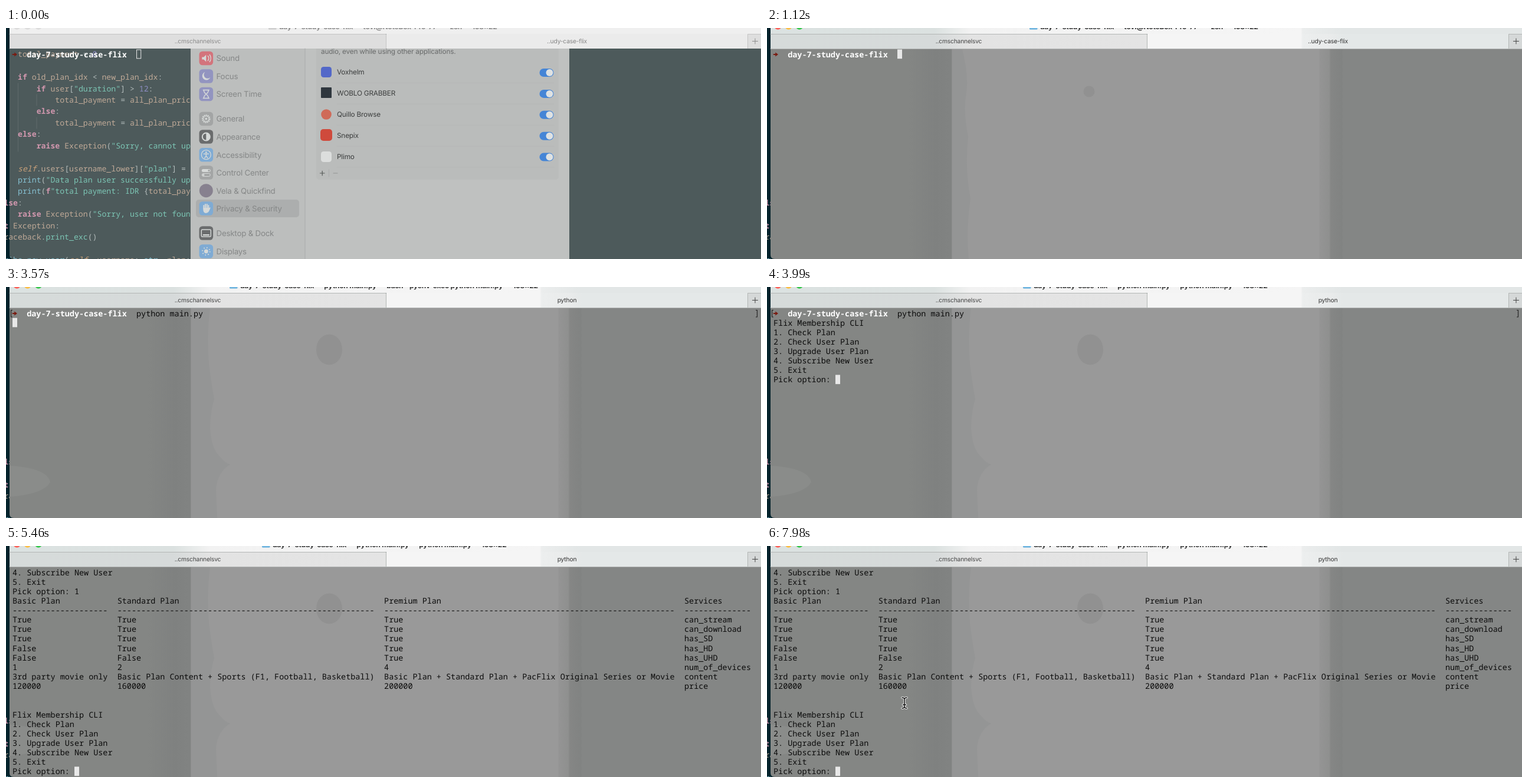
Animation, 1280 px wide and 393 px high, one loop 8 s. Source, as an HTML page:

```html
<!DOCTYPE html>
<html lang="en">
<head>
<meta charset="utf-8">
<title>Terminal session</title>
<style>
  html, body { margin: 0; width: 100%; height: 100%; overflow: hidden; background: #04232c; }
  svg { display: block; width: 100vw; height: 100vh; }
  text { white-space: pre; text-rendering: geometricPrecision; }
  .ui { font-family: Inter, sans-serif; letter-spacing: -.2px; }
  .side { font-size: 13.3px; fill: #858787; }
  .list { font-size: 11.8px; fill: #3b3d3d; }
  .tab { font-size: 10.3px; text-anchor: middle; }
  .title { font-size: 12px; font-weight: 700; }
  .code { font: 13.2px "Noto Sans Mono", monospace; }
  .term { font: 13.463px "Noto Sans Mono", monospace; fill: #0b0b0b; }
  .k { fill: #d197ae; font-weight: 700; }
  .v { fill: #bfa997; }
  .s { fill: #7cc5b4; }
  .f { fill: #86c1d2; }
  .o { fill: #b3bcbb; }
  .n { fill: #8f8ec4; }
  .i { fill: #c9a07a; font-style: italic; }
</style>
</head>
<body>
<svg id="stage" viewBox="0 0 1280 393" preserveAspectRatio="none"></svg>
<script>
const LOOP = 8000, TICK = 70;
const CW = 8.078, RH = 16.14, LEFT = 11, TOP = 36.5;
const CODE_W = 7.92, CODE_H = 19.42;

const esc = s => s.replace(/&/g, '&amp;').replace(/</g, '&lt;');
const rect = (x, y, w, h, fill, rx = 0) =>
  `<rect x="${x}" y="${y}" width="${w}" height="${h}" fill="${fill}" rx="${rx}"/>`;
const disc = (x, y, r, fill) => `<circle cx="${x}" cy="${y}" r="${r}" fill="${fill}"/>`;
const line = (d, stroke, w = 1) =>
  `<path d="${d}" fill="none" stroke="${stroke}" stroke-width="${w}" stroke-linecap="round"/>`;
const text = (x, y, s, cls, more = '') => `<text x="${x}" y="${y}" class="${cls}" ${more}>${esc(s)}</text>`;
const group = (id, body) => `<g id="${id}">${body}</g>`;

// horizontal gradient from [x, colour] stops over the full width
const ramp = (id, stops) =>
  `<linearGradient id="${id}" gradientUnits="userSpaceOnUse" x1="0" x2="1280">` +
  stops.map(([x, c]) => `<stop offset="${x / 1280}" stop-color="${c}"/>`).join('') + '</linearGradient>';

/* ---- editor behind the terminal ---- */
// [row, indent, tokens]; each token starts with its class letter
const CODE = [
  [-2, 0, 'vtotal_payment `o= `n0'],
  [0, 0, 'kif `vold_plan_idx `o< `vnew_plan_idx`o:'],
  [1, 1, 'kif `vuser`o[`s"duration"`o] > `n12`o:'],
  [2, 2, 'vtotal_payment `o= `vall_plan_price'],
  [3, 1, 'kelse`o:'],
  [4, 2, 'vtotal_payment `o= `vall_plan_price'],
  [5, 0, 'kelse`o:'],
  [6, 1, 'kraise `vException`o(`s"Sorry, cannot upgrade'],
  [8, 0, 'iself`o.`vusers`o[`vusername_lower`o][`s"plan"`o] = '],
  [9, 0, 'fprint`o(`s"Data plan user successfully updated'],
  [10, 0, 'fprint`o(`kf`s"total payment: IDR `o{`vtotal_payment'],
  [11, -1, 'kelse`o:'],
  [12, 0, 'kraise `vException`o(`s"Sorry, user not found'],
  [13, -2, 'kexcept `vException`o:'],
  [14, -1, 'vtraceback`o.`sprint_exc`o()'],
  [16, -3, 'kdef `fsubscribe_new_user`o(`iself`o, `vusername`o: `fstr`o, `vplan`o:']
];
const codeLine = ([row, indent, src]) =>
  `<text x="${20 + indent * 4 * CODE_W}" y="${88.2 + row * CODE_H}" class="code">` +
  src.split('`').map(p => `<tspan class="${p[0]}">${esc(p.slice(1))}</tspan>`).join('') + '</text>';
const code = CODE.map(codeLine).join('') +
  line('M20.5 94V210M52 113V132M52 152V171', 'rgba(255,255,255,.1)');

/* ---- settings window ---- */
const BLUE = '#7fabd4', VIOLET = '#9294c0', GREY = '#a3a5a5', DARK = '#6a6c6d', PALE = '#d6d9d8';
const MARK = {
  sound: line('M3 -4Q6 0 3 4M6 -6Q10 0 6 6', PALE, 1.4) + `<path d="M-7 -2H-4L0 -6V6L-4 2H-7Z" fill="${PALE}"/>`,
  moon: `<path d="M-2 -7A7 7 0 1 0 7 2A6 6 0 0 1 -2 -7Z" fill="${PALE}"/>`,
  glass: line('M-5 -7H5M-5 7H5M-4 -7Q-4 -3 0 0Q4 3 4 7M4 -7Q4 -3 0 0Q-4 3 -4 7', PALE, 1.5),
  gear: `<circle r="6" fill="none" stroke="${PALE}" stroke-width="2.4" stroke-dasharray="2 1"/>` +
    `<circle r="4.6" fill="none" stroke="${PALE}"/>` + disc(0, 0, 1.8, PALE),
  half: `<circle r="6.5" fill="none" stroke="${PALE}" stroke-width="2"/><path d="M0 -6A6 6 0 0 1 0 6Z" fill="${PALE}"/>`,
  person: `<circle r="8" fill="none" stroke="${PALE}" stroke-width="1.3"/>` + disc(0, -4, 1.4, PALE) +
    line('M-4 -1.5H4M0 -1V2L-2.5 5.5M0 2L2.5 5.5', PALE, 1.4),
  sliders: rect(-7.5, -6, 15, 5, PALE, 2.5) + disc(4.8, -3.5, 1.7, GREY) +
    `<rect x="-7" y="1.5" width="14" height="5" rx="2.5" fill="none" stroke="${PALE}"/>` + disc(-4.5, 4, 1.7, PALE),
  hand: line('M-4 0V-5M-1.4 0V-7M1.4 0V-7M4 0V-5', PALE, 2) +
    `<path d="M-5 -1H5L7 -2Q8 -1 4 6Q2 8 -1 8Q-5 7 -5 2Z" fill="${PALE}"/>`,
  dock: `<rect x="-8" y="-6" width="16" height="12" rx="1.5" fill="none" stroke="${PALE}" stroke-width="1.5"/>` +
    rect(-5.5, 2, 11, 2.2, PALE),
  sun: disc(0, 0, 3.4, PALE) + `<circle r="6.3" fill="none" stroke="${PALE}" stroke-width="2" stroke-dasharray="1.6 3.35"/>`
};
const SIDE = [
  [51.5, 'Sound', '#d3747c', 'sound'], [82, 'Focus', VIOLET, 'moon'], [112.5, 'Screen Time', VIOLET, 'glass'],
  [154.5, 'General', GREY, 'gear'], [185, 'Appearance', DARK, 'half'], [215.7, 'Accessibility', BLUE, 'person'],
  [246, 'Control Center', GREY, 'sliders'], [276.7, 'Vela & Quickfind', '', ''],
  [307, 'Privacy & Security', BLUE, 'hand'], [349, 'Desktop & Dock', DARK, 'dock'], [380, 'Displays', BLUE, 'sun']
];
const sideRow = ([y, label, fill, mark]) =>
  (mark ? rect(327.5, y - 11.8, 23.6, 23.6, fill, 5.5) + `<g transform="translate(339.3 ${y})">${MARK[mark]}</g>`
        : disc(339.3, y, 11.5, '#87818f')) +
  text(356.5, y + 4.8, label, 'ui side');

const APPS = [
  ['Voxhelm', rect(534, 66, 18, 18, '#5368c8', 4.5)],
  ['WOBLO GRABBER', rect(534, 101, 18, 18, '#2f373e', 1)],
  ['Quillo Browse', disc(543, 147, 8.8, '#cf6a58')],
  ['Snepix', rect(533, 172, 20, 20, '#cf4a3c', 5)],
  ['Plimo', rect(534, 210, 18, 18, '#dcdedd', 4.5)]
];
const appRow = ([label, icon], i) => {
  const y = 76 + i * 35.9;
  return icon + text(561, y + 3.2, label, 'ui list') +
    rect(904.5, y - 7, 24, 14, '#4585d6', 7) + disc(921.5, y, 6, '#dfe2e2') +
    line(`M561 ${y + 17.5}H929`, '#b5b7b6', .8);
};
const settings = rect(313, 35, 642, 358, '#bfc1c0') + rect(313, 35, 194, 358, '#bcbebd') +
  line('M507 35V393', '#a9abab') + rect(322, 292, 175, 30, '#acaeae', 5) +
  SIDE.map(sideRow).join('') +
  rect(526, 54, 411, 204, '#babcbb', 5) + rect(526, 35, 411, 30, '#babcbb') +
  text(534, 44.3, 'audio, even while using other applications.', 'ui list', 'style="fill:#696b6b"') +
  APPS.map(appRow).join('') +
  line('M532.5 247H540M536.2 243.3V250.8', '#555857', 1.2) + line('M547.5 241V253', '#a9abab') +
  line('M555 247H562', '#929494', 1.2);

/* ---- terminal ---- */
const put = (row, col, s, more = '') => text(LEFT + col * CW, 49.5 + row * RH, s, 'term', more);
const block = (row, lines) => lines.map((s, i) => put(row + i, 0, s)).join('');
const MENU = ['Flix Membership CLI', '1. Check Plan', '2. Check User Plan', '3. Upgrade User Plan',
  '4. Subscribe New User', '5. Exit', 'Pick option: '];
const COLS = [0, 22, 78, 141];
const TABLE = [
  ['Basic Plan', 'Standard Plan', 'Premium Plan', 'Services'],
  [20, 54, 61, 14].map(n => '-'.repeat(n)),
  ['True', 'True', 'True', 'can_stream'],
  ['True', 'True', 'True', 'can_download'],
  ['True', 'True', 'True', 'has_SD'],
  ['False', 'True', 'True', 'has_HD'],
  ['False', 'False', 'True', 'has_UHD'],
  ['1', '2', '4', 'num_of_devices'],
  ['3rd party movie only', 'Basic Plan Content + Sports (F1, Football, Basketball)',
    'Basic Plan + Standard Plan + PacFlix Original Series or Movie', 'content'],
  ['120000', '160000', '200000', 'price']
];
const prompt = line('M11.5 45H15', '#7a1c12', 2) + '<path d="M14.2 41.5L19 45L14.2 48.5Z" fill="#7a1c12"/>' +
  put(0, 3, 'day-7-study-case-flix', 'style="font-weight:700;fill:#fff"') +
  '<text id="cmd" x="' + (LEFT + 26 * CW) + '" y="49.5" class="term"></text>' +
  group('marks', line('M10.5 39.5H8.5V51H10.5M1271.5 39.5H1273.5V51H1271.5', '#222', 1.1));
const result = block(0, [...MENU.slice(4, 6), 'Pick option: 1']) +
  TABLE.map((r, i) => r.map((s, c) => put(3 + i, COLS[c], s)).join('')).join('') + block(15, MENU);

/* ---- blurred backdrop ---- */
const BASE = '#949595';
const backdrop = rect(6, 36, 1274, 357, 'url(#glass)') +
  group('edgeA', `<path d="M314 36H331Q342 80 338 110Q332 140 341 185Q335 240 345 290Q337 345 342 393H314Z" fill="${BASE}"/>` +
    disc(546, 108, 9.5, '#919191')) +
  group('edgeB', `<path d="M314 36H346Q340 80 344 130Q348 165 353 190Q346 215 346 240Q348 275 362 288Q372 300 380 302Q358 315 356 345L358 393H314Z" fill="${BASE}"/>` +
    '<ellipse cx="548" cy="106.5" rx="22" ry="26" fill="#919191"/>' +
    '<path d="M6 304Q70 308 75 332Q65 352 6 357Z" fill="#8a8c8a"/>');

/* ---- window frame ---- */
const chrome = (id, strip, tab, live, edge, ink, lights) => group(id,
  rect(6, 0, 1274, 10, strip) + rect(6, 10, 638, 26, tab) + rect(645, 10, 612, 26, live) +
  rect(1257, 10, 23, 26, tab) +
  line('M6 10.5H644.5V35M1257.5 35V10.5H1280M6 35.5H1280', edge) +
  [18.5, 36.5, 55].map((x, i) => disc(x, -3.3, 6, lights[i])).join('') +
  line('M1265.5 22.5H1274.5M1270 18V27', ink, 1) +
  text(325, 26.2, '..cmschannelsvc', 'ui tab', `fill="${ink}"`));

document.getElementById('stage').innerHTML = '<defs>' +
  ramp('glass', [[6, '#848684'], [240, '#848684'], [286, '#7f8180'], [313, '#818382'], [314, '#999'],
    [936, '#999'], [937, '#949494'], [953, '#8f908f'], [956, '#858685'], [975, '#818382'], [976, '#848685'], [1280, '#848685']]) +
  ramp('strip', [[6, '#dbe2e1'], [285, '#dbe1e0'], [345, '#f2f2f2'], [905, '#f5f5f5'], [908, '#ebeded'], [975, '#e2e6e6'], [1280, '#e2e6e6']]) +
  ramp('tabs', [[6, '#d6dbda'], [285, '#d6dada'], [345, '#e3e3e3'], [644, '#e4e4e4'], [1256, '#d5d8d8'], [1280, '#d5d8d8']]) +
  ramp('live', [[645, '#f5f5f5'], [905, '#f5f5f5'], [908, '#eceeee'], [955, '#e9ebeb'], [976, '#e4e8e8'], [1280, '#e4e8e8']]) +
  '<clipPath id="rim"><rect width="6" height="393"/></clipPath>' +
  '<clipPath id="pane"><rect x="6" y="35" width="307" height="358"/></clipPath></defs>' +
  rect(0, 0, 1280, 393, '#04232c') + `<g clip-path="url(#rim)">${code}</g>` +
  chrome('idle', '#efefef', '#dedede', '#ebebeb', '#c4c4c4', '#8b8b8b', ['#dcdcdc', '#dcdcdc', '#dcdcdc']) +
  group('clear', rect(6, 35, 1274, 358, '#4d5a5b') + `<g clip-path="url(#pane)">${code}</g>` + settings) +
  group('blur', backdrop) +
  chrome('busy', 'url(#strip)', 'url(#tabs)', 'url(#live)', '#b3b6b5', '#444', ['#fc5f57', '#fdbc40', '#34c749']) +
  '<text id="tabName" x="951" y="26.2" class="ui tab"></text>' +
  group('folder', rect(0, -8, 13.5, 10.8, '#74b7e0', 1.5)) +
  '<text id="title" y="2.3" class="ui title"></text>' +
  group('close', line('M14 20L19.5 25.5M19.5 20L14 25.5', '#9da1a0', 1.1)) +
  group('prompt', prompt) + group('menu', block(1, MENU)) + group('pick', put(7, 13, '1')) +
  group('result', result) +
  '<rect id="caret"/>' +
  '<path d="M6 386Q6 393 13 393H6Z" fill="#04232c"/>' +
  group('mouse', ['#eee', '#111'].map((c, i) =>
    line('M-4 -9Q0 -9 0 -6V6Q0 9 -4 9M4 -9Q0 -9 0 -6M0 6Q0 9 4 9M-2.5 3H2.5', c, i ? 1.5 : 3.6)).join(''));

/* ---- timeline ---- */
const CARET = [[0, 26, 0], [2100, 27, 0], [2450, 41, 0], [3290, 40, 0], [3500, 0, 1],
  [3710, 13, 7], [4340, 14, 7], [5320, 0, 8], [5390, 13, 21]];
const TYPED = [[0, ''], [2100, 'p'], [2450, 'python main.py']];
const DIR = 'day-7-study-case-flix — ';
const TITLE = [
  [0, 463, DIR + 'tovi@NoteBox-Pro-77 — -zsh — 158×22'],
  [3570, 397, DIR + 'python main.py — bash - pyenv-exec python main.py — 158×22'],
  [3710, 452, DIR + 'python main.py — python main.py — 158×22']
];
const PATHS = [
  [[6160, 1169, 171], [6300, 940, 110], [6440, 646, 42], [6510, 646, 42]],
  [[6790, 293, 72], [6860, 268, 135], [6930, 246, 195], [7000, 236, 230], [7140, 236, 230],
    [7210, 235, 244], [7350, 233.5, 271], [7420, 233.5, 271], [7490, 233, 267], [LOOP, 233, 267]]
];
const last = (table, t) => table.filter(r => r[0] <= t).pop();
const mouseAt = t => {
  const path = PATHS.find(p => t >= p[0][0] && t < p[p.length - 1][0]);
  if (!path) return null;
  const i = path.findIndex(p => p[0] > t), a = path[i - 1], b = path[i];
  const u = (t - a[0]) / (b[0] - a[0]);
  return [a[1] + (b[1] - a[1]) * u, a[2] + (b[2] - a[2]) * u];
};

const $ = id => document.getElementById(id);
const show = (id, on) => { $(id).style.display = on ? '' : 'none'; };
const set = (id, attrs) => { for (const k in attrs) $(id).setAttribute(k, attrs[k]); };
const write = (id, s) => { if ($(id).textContent !== s) $(id).textContent = s; };

function draw(t) {
  const focus = t >= 1120, done = t >= 5390;
  show('clear', !focus);
  show('idle', !focus);
  show('blur', focus);
  show('busy', focus);
  show('edgeA', t < 1190);
  show('edgeB', t >= 1190);
  show('prompt', !done);
  show('marks', t >= 3500);
  show('menu', t >= 3710 && !done);
  show('pick', t >= 4340 && !done);
  show('result', done);
  show('close', t >= 6790 && t < 6930);

  const [, x, title] = last(TITLE, t);
  write('title', title);
  write('cmd', last(TYPED, t)[1]);
  write('tabName', t < 3570 ? '..udy-case-flix' : 'python');
  set('title', { x, fill: focus ? '#3a3b3b' : '#8d8d8d' });
  set('tabName', { fill: focus ? '#333' : '#858585' });
  set('folder', { transform: `translate(${x - 18} 0)`, opacity: focus ? 1 : .45 });
  $('folder').style.filter = focus ? '' : 'grayscale(1)';

  const [, col, row] = last(CARET, t), cx = LEFT + col * CW, cy = TOP + row * RH;
  set('caret', focus
    ? { x: cx, y: cy, width: 8, height: 15.7, fill: '#e8e8e8', stroke: 'none' }
    : { x: cx + .5, y: cy + .5, width: 7.2, height: 14.8, fill: 'none', stroke: '#e8e8e8' });

  const m = mouseAt(t);
  show('mouse', m);
  if (m) set('mouse', { transform: `translate(${m[0]} ${m[1]})` });
}

const start = performance.now();
function frame() {
  const t = (performance.now() - start) % LOOP;
  draw(Math.floor(t / TICK) * TICK);
  requestAnimationFrame(frame);
}
frame();
</script>
</body>
</html>
```
